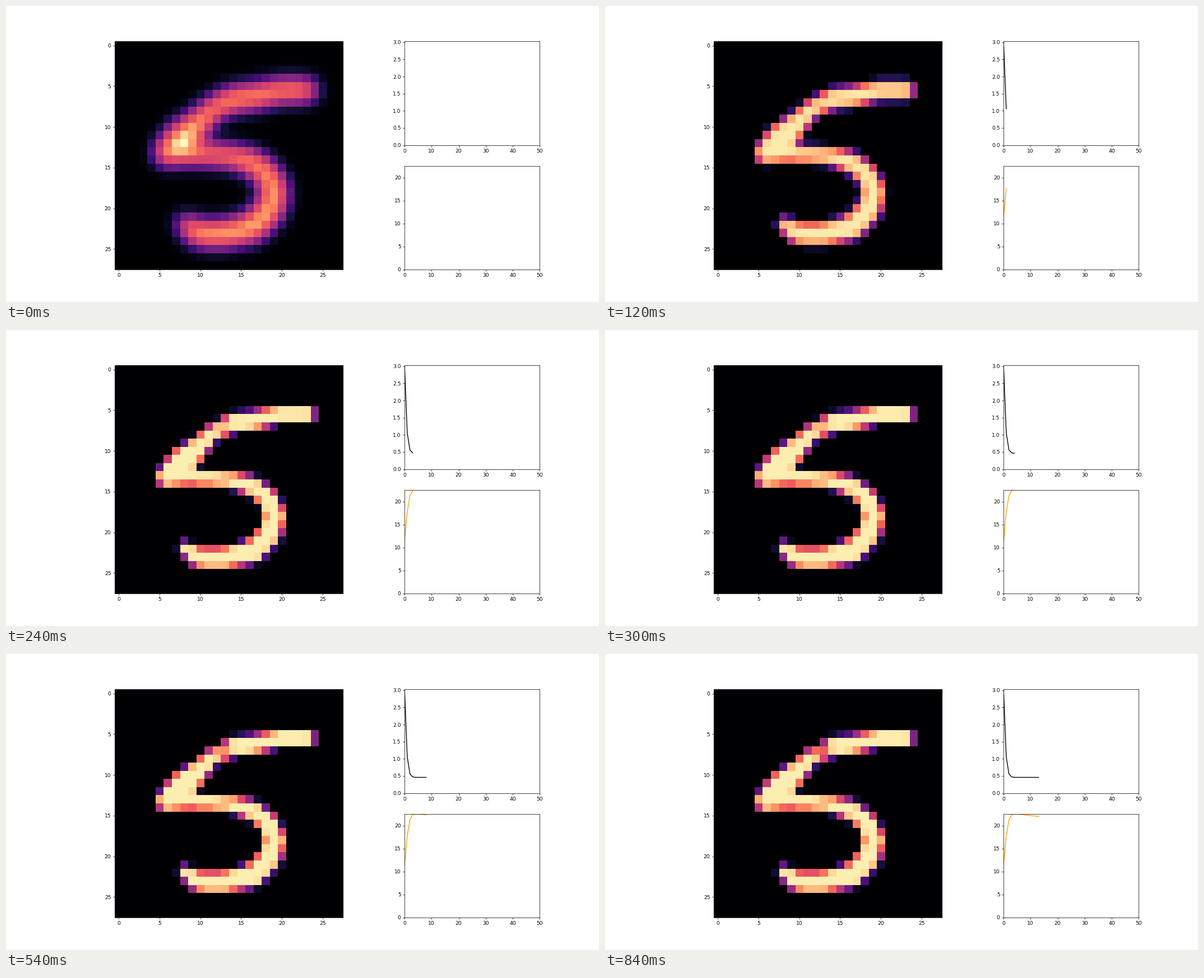
Recreate the animation shown at these times as a matplotlib script. Size 1058 by 529 pixels, loop 900 ms.

```python
import numpy as np
import matplotlib.pyplot as plt
from matplotlib.animation import FuncAnimation

SIZE, SUB, FRAMES, INTERVAL = 28, 8, 15, 60

# Pen path of the digit: x, y, pen radius, in pixel units.
PEN = np.array([
    (23.6, 6, .98), (20, 6.05, 1), (17, 6.8, 1.1), (14.6, 7, 1.1),
    (11.9, 8.3, .92), (10.5, 9.8, 1.15), (8.4, 11.8, 1.75), (6.3, 13.7, 1.2),
    (9, 13.8, .85), (14, 14, .9), (16.8, 14.8, 1.1), (18.8, 16.3, 1.15),
    (19.6, 18.4, 1.28), (19.1, 20.6, 1.3), (17, 22.8, 1.38),
    (13.5, 23.6, 1.27), (10.3, 23.6, 1.2), (8.6, 22.4, .75),
])

fine = (np.arange(SIZE * SUB) + .5) / SUB
gx, gy = np.meshgrid(fine, fine)
px, py = np.meshgrid(np.arange(SIZE) + .5, np.arange(SIZE) + .5)


def segment(start, end):
    """Area swept by the pen between two points."""
    dx, dy, dr = end - start
    x, y = gx - start[0], gy - start[1]
    t = np.clip((x * dx + y * dy) / (dx * dx + dy * dy), 0, 1)
    return np.hypot(x - t * dx, y - t * dy) <= start[2] + t * dr


digit = np.any([segment(a, b) for a, b in zip(PEN, PEN[1:])], axis=0)


def blurred(sigma):
    """Coverage of each pixel by the digit after a Gaussian blur."""
    kernel = np.exp(-((fine[:, None] - fine) / sigma) ** 2 / 2)
    kernel /= kernel.sum(axis=1, keepdims=True)
    rows = kernel.reshape(SIZE, SUB, -1).mean(axis=1)
    return rows @ digit @ rows.T


def estimate(k):
    """Digit after k deblurring steps; the blur eases out, the tone turns linear."""
    sigma = .05 + .9 * np.exp(-k * k / 4)
    power = 1 + 1.3 * sigma
    b = blurred(sigma)
    if k == 0:
        return .7 * (1 - (1 - b) ** power) + .3 * (b / b.max()) ** 8
    b = np.clip(b - .12 * sigma, 0, 1)
    image = .97 * (1 - (1 - b) ** power)
    # The shoulder of the digit slowly wears away.
    wear = .42 * k / FRAMES * np.exp(-np.hypot(px - 13.1, py - 7.2) ** 2)
    image = np.clip(image - wear, 0, 1)
    return np.where(image < .045, 0, image)


images = [estimate(k) for k in range(FRAMES)]
steps = np.arange(FRAMES)
loss = .459 + 2.565 * np.exp(-1.45 * steps ** 1.16)
quality = 22.86 - .067 * steps - 11.56 * np.exp(-.82 * steps ** 1.35)

fig = plt.figure(figsize=(16, 8), dpi=66.125)
grid = fig.add_gridspec(2, 3, left=.125, right=.9, bottom=.11, top=.88,
                        wspace=.2, hspace=.2)
picture = fig.add_subplot(grid[:, :2]).imshow(images[0], cmap="magma", vmin=0, vmax=1)


def curve(cell, color, top):
    ax = fig.add_subplot(cell)
    ax.set(xlim=(0, 50), ylim=(0, top))
    return ax.plot([], [], color=color)[0]


curves = [(curve(grid[0, 2], "black", 3.02), loss),
          (curve(grid[1, 2], "orange", 22.56), quality)]


def update(k):
    picture.set_data(images[k])
    for line, values in curves:
        line.set_data(steps[:k], values[:k])
    return [picture] + [line for line, _ in curves]


anim = FuncAnimation(fig, update, frames=FRAMES, interval=INTERVAL, repeat=True)
plt.show()
```
